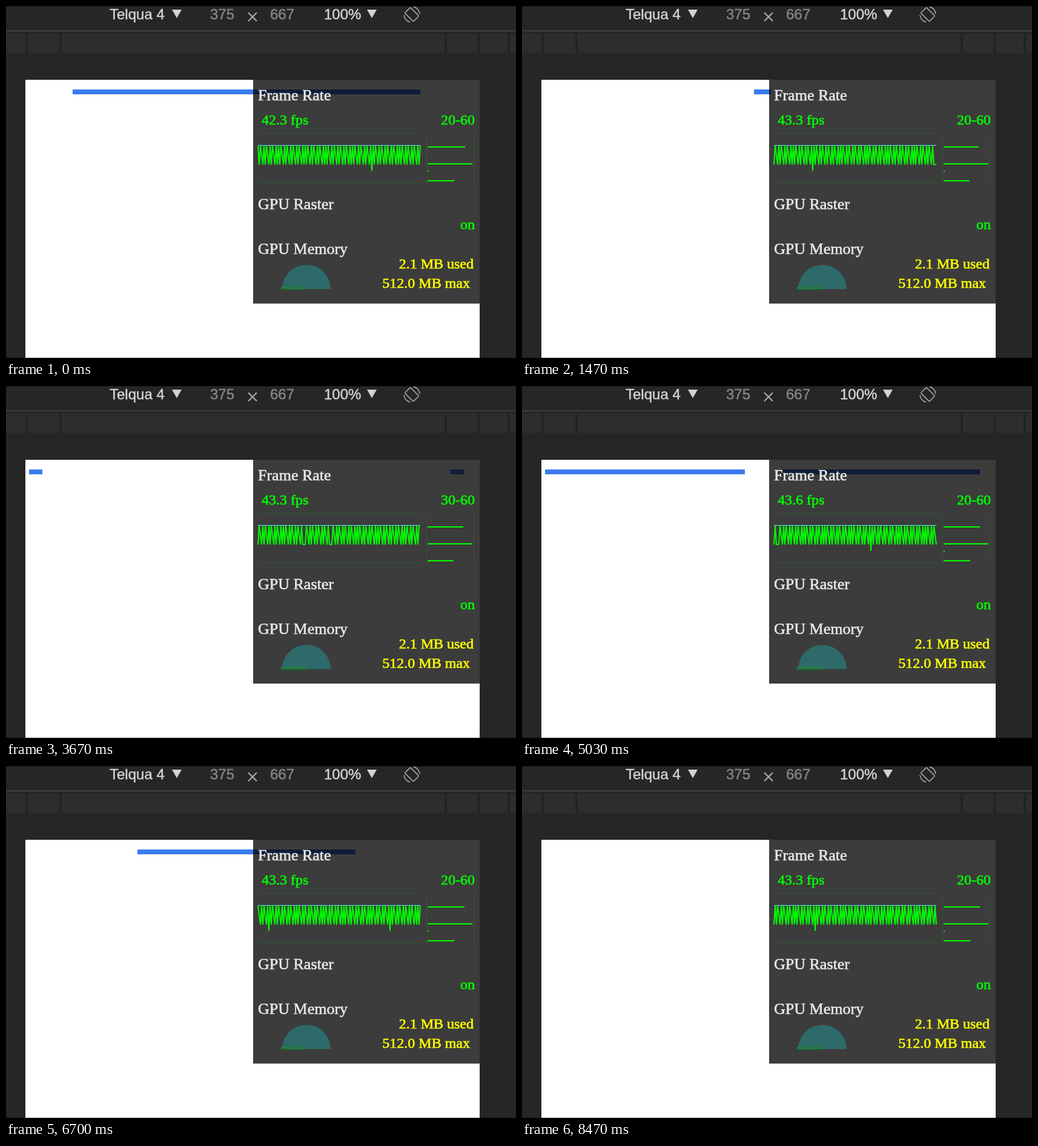
An HTML page that plays this animation: 842x582 px, repeating every 8510 ms.

```html
<!DOCTYPE html>
<html lang="en">
<head>
<meta charset="utf-8">
<title>Frame rate meter</title>
<style>
  html, body { margin: 0; width: 100%; height: 100%; overflow: hidden; background: #262626; }
  svg { display: block; width: 842px; height: 582px; }
  .ui { font: 24px "Liberation Sans", Arial, sans-serif; fill: #d2d2d2; stroke: #d2d2d2; stroke-width: .5px; }
  .ui .dim { fill: #84848a; stroke: #84848a; }
  .meter { font: 24px "Liberation Serif", Times, serif; stroke-width: .65px; }
  .head { font-size: 26px; fill: #e8e8e8; stroke: #e8e8e8; }
  .green { fill: #0f0; stroke: #0f0; }
  .yellow { fill: #ff0; stroke: #ff0; }
  .end { text-anchor: end; }
</style>
</head>
<body>
<svg viewBox="0 0 842 582">
  <rect width="842" height="582" fill="#262626"/>

  <g class="ui">
    <text x="171" y="22">Telqua 4</text>
    <text class="dim" x="337" y="22">375</text>
    <text class="dim" x="436" y="22">667</text>
    <text x="525" y="22">100%</text>
    <path d="M274 6h16l-8 14zM596 6h16l-8 14z" stroke="none"/>
  </g>
  <g fill="none" stroke="#a6a6a6">
    <path d="M400 11l14 14M414 11l-14 14" stroke-width="2.4"/>
    <g transform="translate(670 14)" stroke-width="1.6">
      <rect x="-6.5" y="-10" width="13" height="20" rx="1.5" transform="rotate(-45)"/>
      <path d="M13 -1A13 13 0 0 0 3 -12.6M-13 1A13 13 0 0 0 -3 12.6"/>
    </g>
  </g>
  <rect y="40" width="842" height="2" fill="#3e3e3e"/>
  <rect y="46" width="842" height="32" fill="#232323"/>
  <path d="M0 46h32v32H0zM36 46h52v32H36zM92 46h632v32H92zM728 46h50v32h-50zM782 46h46v32h-46zM832 46h10v32h-10z" fill="#2d2d2d"/>

  <rect x="32" y="122" width="750" height="460" fill="#fff"/>
  <path id="bar" fill="#3a7bf0"/>
  <rect x="408" y="122" width="374" height="370" fill="#000" fill-opacity=".765"/>

  <path d="M416 210.5h269M416 292.5h269M694.5 210v84M772.5 210v84" fill="none" stroke="#2f582f"/>
  <path id="graph" fill="none" stroke="#0f0" stroke-width="2" stroke-linejoin="bevel"/>
  <path d="M416 230.5h268" stroke="#4ff5e0"/>
  <path id="histogram" stroke="#0f0" stroke-width="2"/>

  <path d="M456 468a40 40 0 0 1 80 0z" fill="#2e6a6a"/>
  <rect x="454" y="464" width="42" height="4" fill="#267a48"/>
  <rect x="453" y="468" width="43" height="3" fill="#2c5034"/>

  <g class="meter">
    <text class="head" x="416" y="156">Frame Rate</text>
    <text class="head" x="416" y="336">GPU Raster</text>
    <text class="head" x="416" y="410">GPU Memory</text>
    <text class="green" id="fps" x="422" y="196"></text>
    <text class="green end" id="range" x="774" y="196"></text>
    <text class="green end" x="774" y="369">on</text>
    <text class="yellow end" x="772" y="434">2.1 MB used</text>
    <text class="yellow end" x="766" y="466">512.0 MB max</text>
  </g>
  <path d="M0 .5h842M0 581.5h842" stroke="#000" stroke-opacity=".35"/>
</svg>
<script>
  const LOOP = 8510, TICK = 100 / 3;
  const WINDOW = 134, RIGHT = 684;
  const CENTER = 397, HALF = 359;

  // tick, rendered steps, fps reading, histogram ends at 60 fps and at the bottom
  const KEYS = [
    [0, 40, 42.3, 758, 740],
    [44, 102, 43.3, 754, 739],
    [110, 197, 43.3, 755, 739],
    [151, 254, 43.6, 756, 740],
    [176, 290, 43.3, 758, 740],
    [226, 361, 43.3, 756, 740],
    [254, 400, 43.3, 756, 740]
  ];
  const HITCHES = new Set([0, 200, 300]);
  const STUTTERS = new Set([101, 123]);

  const el = id => document.getElementById(id);
  const bar = el('bar'), graph = el('graph'), histogram = el('histogram');
  const fpsText = el('fps'), rangeText = el('range');

  function stateAt(tick) {
    let i = 0;
    while (i < KEYS.length - 2 && tick >= KEYS[i + 1][0]) i++;
    const a = KEYS[i], b = KEYS[i + 1];
    const u = Math.min(1, (tick - a[0]) / (b[0] - a[0]));
    const mix = c => a[c] + (b[c] - a[c]) * u;
    return {
      step: Math.floor(mix(1) + 1e-6),
      fps: (u < 0.5 ? a : b)[2],
      top: Math.round(mix(3)),
      bottom: Math.round(mix(4))
    };
  }

  // 41 slow samples spread evenly over each hundred;
  // the second of two fast ones in a row is not plotted.
  function sample(i) {
    if (HITCHES.has(i)) return 20;
    const r = (((i * 41 + 18) % 100) + 100) % 100;
    if (r < 41 || STUTTERS.has(i)) return 30;
    return r < 82 ? 60 : null;
  }

  const block = (x0, x1) => `M${x0} 138H${x1}V146H${x0}z`;

  // The bar grows from the middle, then a gap opens from the middle.
  function barPath(step) {
    const c = step % 100;
    const half = Math.round((c % 50) / 50 * HALF);
    const left = CENTER - half, right = CENTER + half;
    if (c < 50) return half ? block(left, right) : '';
    return block(CENTER - HALF, left) + block(right, CENTER + HALF);
  }

  function draw(time) {
    const tick = Math.floor((time % LOOP + 5.01) / TICK);
    const { step, fps, top, bottom } = stateAt(Math.min(tick, 254));
    const points = [];
    let low = 60;
    for (let i = step - WINDOW; i <= step; i++) {
      const value = sample(i);
      if (value === null) continue;
      low = Math.min(low, value);
      points.push(`${RIGHT - 2 * (step - i)} ${(293 - value * 1.03).toFixed(1)}`);
    }
    bar.setAttribute('d', barPath(step));
    graph.setAttribute('d', 'M' + points.join('L'));
    histogram.setAttribute('d',
      `M696 233H${top}M696 261H770M696 289H${bottom}` + (low < 30 ? 'M696 273H698' : ''));
    fpsText.textContent = fps.toFixed(1) + ' fps';
    rangeText.textContent = low + '-60';
  }

  const start = performance.now();
  function loop() {
    draw(performance.now() - start);
    requestAnimationFrame(loop);
  }
  loop();
</script>
</body>
</html>
```
